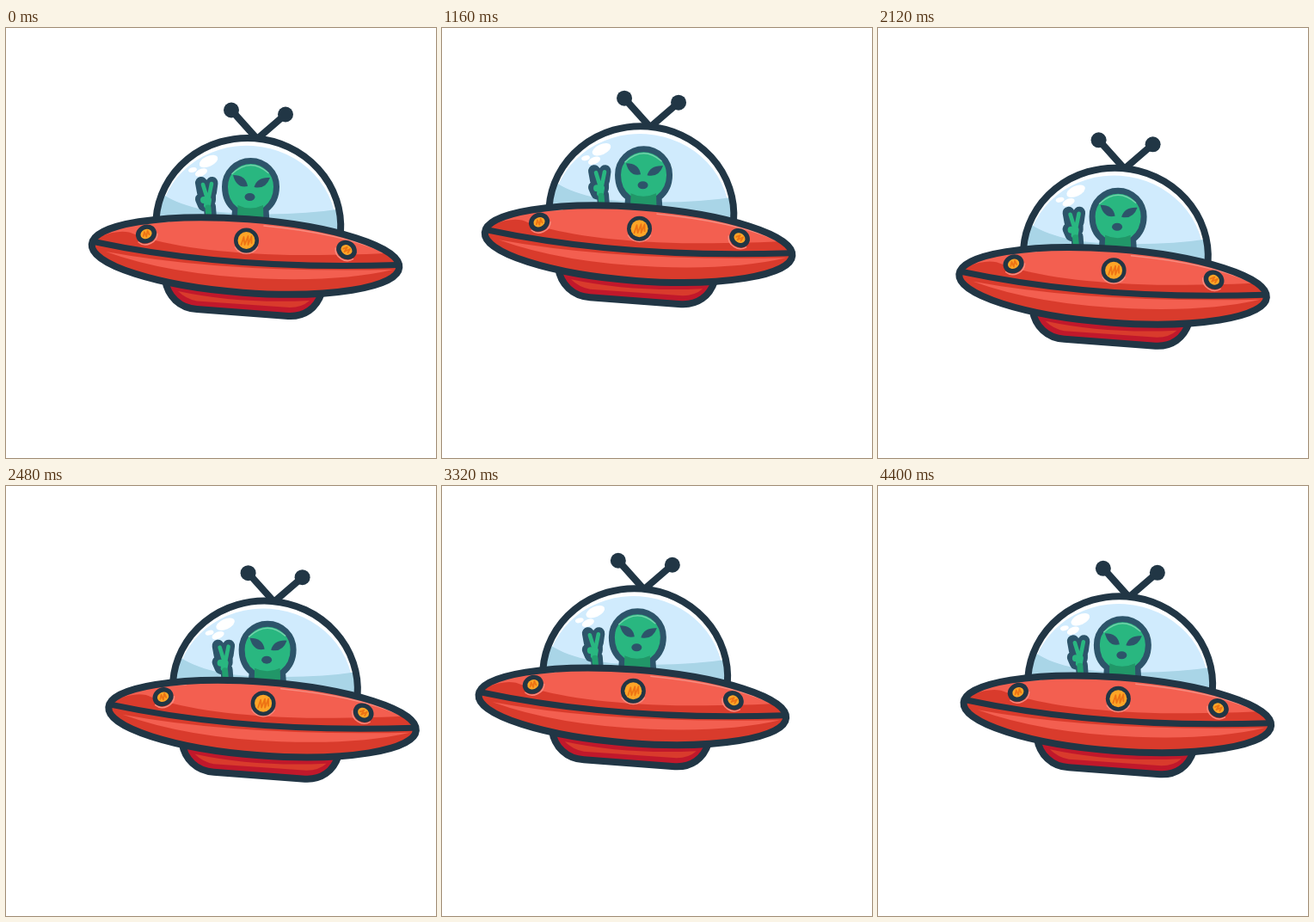
An HTML page that plays this animation: 500x500 px, repeating every 4.44 s.

```html
<!DOCTYPE html>
<html lang="en">
<head>
<meta charset="utf-8">
<title>Flying saucer</title>
<style>
  html, body { margin: 0; width: 100%; height: 100%; overflow: hidden; background: #fff; }
  svg { display: block; width: 100vw; height: 100vh; }
  .line { fill: none; stroke: #213645; stroke-width: 8; stroke-linecap: round; stroke-linejoin: round; }
  .ink { fill: #213645; }
  .soft { fill: #2d546a; }
  .bright { fill: #f35f50; }
  .deep { fill: #d93b2c; }
  .lamp { fill: #fda527; }
  .shine { fill: none; stroke: #f78b7e; stroke-width: 1.5; stroke-linecap: round; }
  .scribble { fill: none; stroke: #ee7414; stroke-width: 1.8; stroke-linecap: round; stroke-linejoin: round; }
</style>
</head>
<body>
<svg viewBox="0 0 500 500">
  <defs>
    <clipPath id="hull"><ellipse cx="278.5" cy="265" rx="179.3" ry="42.8" transform="rotate(4.3 278.5 265)"/></clipPath>
    <clipPath id="dome"><path d="M174.5 222A107.5 102 4.3 0 1 389 238V260H174.5Z"/></clipPath>
    <g id="window">
      <path class="shine" d="M-12 5A13 11.5 0 0 0 12 5"/>
      <ellipse class="ink" rx="12.3" ry="10.8"/>
      <ellipse class="lamp" rx="6.8" ry="5.5"/>
      <path class="scribble" d="M-4 1L-1 -3L-1 3L3 -3L3 2"/>
    </g>
  </defs>
  <g id="ship">
    <!-- antennae -->
    <path class="line" d="M262 95.5L292 129L325 100.5"/>
    <circle class="ink" cx="262" cy="95.5" r="9"/>
    <circle class="ink" cx="325" cy="100.5" r="9"/>

    <!-- glass and pilot -->
    <g clip-path="url(#dome)">
      <rect x="165" y="115" width="235" height="145" fill="#fff"/>
      <path fill="#d0ebfd" d="M178 226A103 96 4.3 0 1 384 240V260H178Z"/>
      <path fill="#a9d5e7" d="M174 187C196 206 232 215 280 216Q342 218 392 210V260H174Z"/>
      <g fill="#fff">
        <ellipse cx="235.5" cy="155" rx="11.5" ry="6" transform="rotate(-24 235.5 155)"/>
        <ellipse cx="227" cy="168" rx="7.5" ry="4" transform="rotate(-24 227 168)"/>
        <ellipse cx="217" cy="165" rx="5" ry="2.8" transform="rotate(-15 217 165)"/>
      </g>
      <g fill="none" stroke-linecap="round" stroke-linejoin="round">
        <path stroke="#2d546a" stroke-width="14" d="M227 180L229 191H238L239.500 180M237 191V200L227 199L230 206L237 208L238 222"/>
        <path stroke="#29b780" stroke-width="4.600" d="M229 182L233 195M239 181L236 196"/>
        <path stroke="#29b780" stroke-width="8" d="M230 200L235 200L234 206"/>
        <path stroke="#22a06f" stroke-width="7" d="M235 209L236 222"/>
      </g>
      <path fill="#29b780" stroke="#2d546a" stroke-width="7" d="M265.500 226L266.500 211C257 204 254.500 194 254.500 184.500A30 30 0 0 1 314.500 184.500C314.500 194 311 204 302 211L303 226Z"/>
      <path fill="#219768" d="M269.500 206Q284 213 299 206L299.500 226H269Z"/>
      <path fill="none" stroke="#72d2aa" stroke-width="1.500" stroke-linecap="round" d="M263 169.500Q284 150 305 168.500"/>
      <g class="soft">
        <path d="M264 171Q279 171 281 184Q268 187 264 171Z"/>
        <path d="M307 174Q292 173 288.500 185Q302 188 307 174Z"/>
        <ellipse cx="283.500" cy="196.500" rx="6" ry="4.500"/>
      </g>
    </g>
    <path class="line" d="M174.500 222A107.500 102 4.300 0 1 389 238"/>

    <!-- underside -->
    <path class="line" style="fill:#c1182b" d="M185 293C188 312 202 326 222 327L328 335C347 336 361 326 367 308Z"/>
    <path class="deep" d="M200 306Q270 321 353 317Q344 325 330 325L222 317.500Q209 315 200 306Z"/>

    <!-- hull -->
    <g clip-path="url(#hull)">
      <rect class="deep" x="90" y="210" width="380" height="110"/>
      <path class="bright" d="M108 243Q135 232 150 240Q210 261 330 264Q400 264 441 262L420 215H110Z"/>
      <path class="bright" d="M116 260Q250 285 450 281Q390 295 300 291.500Q190 287 116 260Z"/>
      <path class="shine" d="M115 237Q144 226 190 225M300 230Q390 239 438 260"/>
    </g>
    <path class="line" stroke-linecap="butt" style="stroke-width:7" d="M102 248.500Q260 282 455 275.500"/>
    <ellipse class="line" cx="278.500" cy="265" rx="179.300" ry="42.800" transform="rotate(4.300 278.500 265)"/>

    <!-- portholes -->
    <use href="#window" transform="translate(163 239.500) rotate(-24)"/>
    <use href="#window" transform="translate(396 258) rotate(32)"/>
    <g transform="translate(279.500 247)">
      <path class="shine" d="M-13 8A15.300 15.300 0 0 0 13 8"/>
      <circle class="ink" r="14.500"/>
      <circle class="lamp" r="10"/>
      <path class="scribble" d="M-6 5L-3 -4L-2 5L2 -5L2 5L6 -5L6 3"/>
    </g>
  </g>
</svg>
<script>
  const LOOP = 4440, STEP = 40;

  // waypoints of the two laps, evenly spaced in time; the ship rests at the first
  const route = {
    x: [0, 15.5, 11, -10, -30.5, -47, -57, -54, -40, -18.5,
        4.5, 19.7, 9, -19.5, -45, -57.3, -50.5, -33.5, -15.5, -4],
    y: [0, -13, -31.4, -31.5, -25, -16.3, -3.5, 14, 25.2, 34,
        32, 11.3, -25, -34, -25.5, -8, 6.5, 14, 12, 5]
  };
  const ship = document.getElementById("ship");

  // smooth curve through the points, p in 0..1
  function glide(points, p) {
    const n = points.length;
    const point = i => points[i % n];
    const slope = i => i % n ? (point(i + 1) - point(i - 1)) / 2 : 0;
    const i = Math.floor(p * n), u = p * n - i, v = 1 - u;
    return v * v * (1 + 2 * u) * point(i) + u * u * (1 + 2 * v) * point(i + 1)
      + u * v * (v * slope(i) - u * slope(i + 1));
  }

  const start = performance.now();
  function draw(now) {
    const elapsed = Math.max(0, now - start) % LOOP;
    const p = Math.floor(elapsed / STEP) * STEP / LOOP;
    const x = glide(route.x, p), y = glide(route.y, p);
    ship.setAttribute("transform", `translate(${x.toFixed(2)} ${y.toFixed(2)})`);
    requestAnimationFrame(draw);
  }
  draw(start);
</script>
</body>
</html>
```
